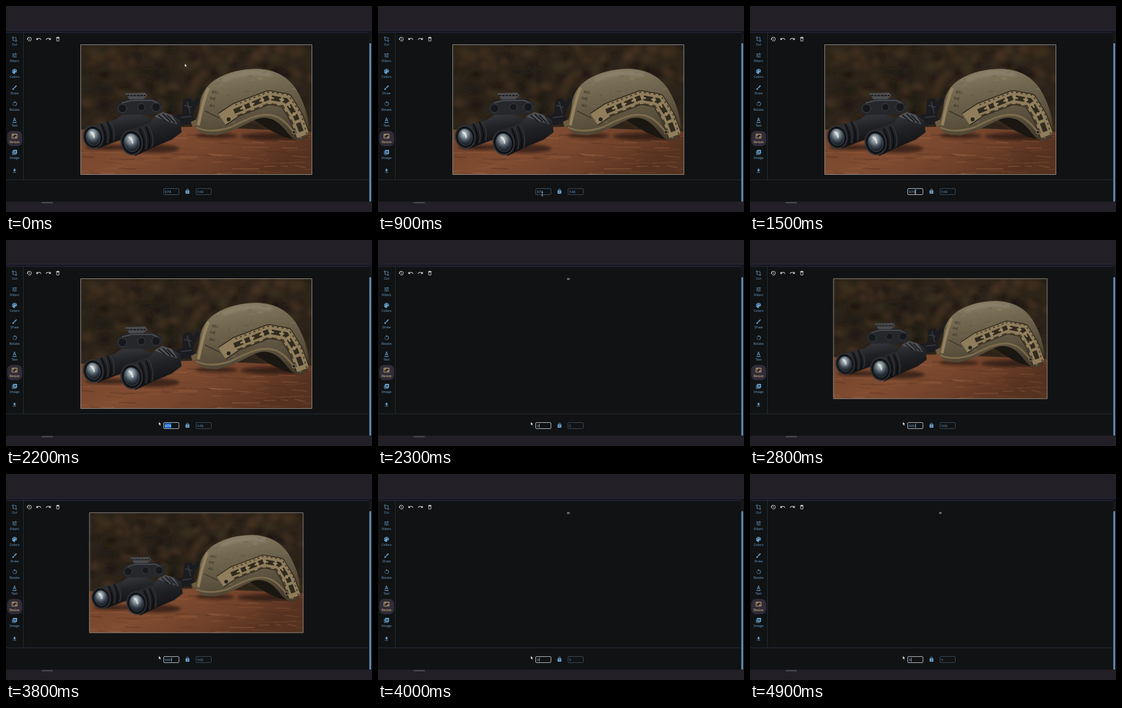
An HTML page that plays this animation: 600 px wide and 338 px high, repeating every 5 s.

```html
<!DOCTYPE html>
<html lang="en">
<head>
<meta charset="utf-8">
<title>Resize panel</title>
<style>
html, body { margin: 0; width: 100%; height: 100%; overflow: hidden; background: #101213; }
svg { display: block; width: 600px; height: 338px; }
text { font-family: "Noto Sans", "Open Sans", sans-serif; }
.label { font-size: 5.4px; text-anchor: middle; }
.num { font-size: 6.1px; }
.ink { font-family: "Liberation Sans", sans-serif; font-size: 6px; font-style: italic; fill: #25221f; }
</style>
</head>
<body>
<svg viewBox="0 0 600 338" xmlns="http://www.w3.org/2000/svg">
  <defs>
    <linearGradient id="wood" x1="0" y1="0" x2="1" y2=".35">
      <stop offset="0" stop-color="#714229"/><stop offset=".4" stop-color="#814d32"/>
      <stop offset=".75" stop-color="#70412a"/><stop offset="1" stop-color="#563220"/>
    </linearGradient>
    <linearGradient id="shell" x1=".3" y1="0" x2=".55" y2="1">
      <stop offset="0" stop-color="#867b64"/><stop offset=".3" stop-color="#72674f"/>
      <stop offset=".7" stop-color="#5a503d"/><stop offset="1" stop-color="#453b2c"/>
    </linearGradient>
    <linearGradient id="tube" x1=".3" y1="0" x2=".55" y2="1">
      <stop offset="0" stop-color="#393b40"/><stop offset=".4" stop-color="#212226"/>
      <stop offset="1" stop-color="#0d0d0f"/>
    </linearGradient>
    <radialGradient id="glass" cx=".5" cy=".3" r=".7">
      <stop offset="0" stop-color="#d6dad8"/><stop offset=".3" stop-color="#87949c"/>
      <stop offset=".65" stop-color="#39434e"/><stop offset="1" stop-color="#111317"/>
    </radialGradient>
    <filter id="soft" x="-10%" y="-10%" width="120%" height="120%"><feGaussianBlur stdDeviation="3.5"/></filter>
    <filter id="blur" x="-20%" y="-50%" width="140%" height="200%"><feGaussianBlur stdDeviation="2.2"/></filter>
    <clipPath id="crop"><rect x="122" y="63" width="380" height="214"/></clipPath>
    <clipPath id="dome"><path id="domeShape" d="M311 198C310 189 316 176 318 160C319 146 328 131 343 121C363 108 389 103 411 103C443 104 463 117 476 137C488 157 496 179 496 203C496 214 490 221 480 221C468 220 462 207 453 198C440 184 424 179 407 187C388 196 371 207 346 212C328 213 313 208 311 198Z"/></clipPath>
  </defs>

  <rect width="600" height="338" fill="#101213"/>
  <rect width="600" height="40" fill="#221f26"/>
  <rect y="39.4" width="600" height="1.1" fill="#2c2c47"/>
  <rect y="40.5" width="600" height="2.5" fill="#19181e"/>
  <rect y="43" width="595" height="1" fill="#23283d"/>
  <rect x="28" y="44" width="1" height="241" fill="#232b38"/>
  <rect y="284.6" width="595" height="1" fill="#272f3d"/>
  <rect x="595" y="44" width="5" height="277" fill="#16171b"/>
  <rect x="595.7" y="61" width="2.8" height="260" rx="1.2" fill="#6596c1"/>
  <rect y="321" width="600" height="17" fill="#221f26"/>
  <rect x="58" y="321.6" width="19" height="2.2" rx="1" fill="#4b4a50"/>
  <rect x="2" y="205" width="24.5" height="25" rx="8" fill="#302c39"/>
  <g id="icons"></g>

  <g id="photo">
    <g clip-path="url(#crop)">
      <rect x="122" y="63" width="380" height="214" fill="#2e241a"/>
      <g id="leaves" filter="url(#soft)"></g>
      <path d="M122 203L310 198L502 206V277H122Z" fill="url(#wood)"/>
      <g id="grain"></g>
      <g fill="#120a07" opacity=".6" filter="url(#blur)">
        <ellipse cx="172" cy="232" rx="42" ry="4"/><ellipse cx="242" cy="234" rx="42" ry="7"/>
        <ellipse cx="345" cy="213" rx="34" ry="4"/><ellipse cx="440" cy="214" rx="55" ry="6"/>
      </g>

      <path d="M407 187C440 172 470 186 486 219C462 222 432 204 407 187Z" fill="#1a1611"/>
      <use href="#domeShape" fill="url(#shell)"/>
      <g clip-path="url(#dome)" fill="none">
        <g id="wear"></g>
        <path d="M355 122C378 110 407 108 436 113" stroke="#a19a86" stroke-width="8" opacity=".35" filter="url(#blur)"/>
        <path d="M311 199C329 207 350 205 368 199C392 188 411 176 434 179C462 184 467 209 484 216" stroke="#7d6c4d" stroke-width="3"/>
        <path d="M315 196C320 175 322 158 332 134" stroke="#94825f" stroke-width="5"/>
        <path d="M326 172L350 184" stroke="#3b3326" stroke-width="1.4"/>
        <g stroke-linejoin="round">
          <path d="M354 186L378 170L431 150L459 155L475 181L487 213" stroke="#2f281d" stroke-width="24"/>
          <path d="M354 186L378 170L431 150L459 155L475 181L487 213" stroke="#8f7d5b" stroke-width="21"/>
          <path d="M374 173L431 150L459 155L475 181L485 208" stroke="#312a1f" stroke-width="8" stroke-dasharray="15 4 9 5"/>
          <path d="M384 169L431 150L459 155L474 180" stroke="#a08c67" stroke-width="2.5" stroke-dasharray="8 9"/>
          <path d="M376 162L431 141L463 146L484 178L493 210" stroke="#3f3527" stroke-width="2" stroke-dasharray="3 5"/>
          <path d="M379 180L431 160L454 164L468 188L477 212" stroke="#41372a" stroke-width="2.4" stroke-dasharray="9 6"/>
        </g>
        <circle cx="365" cy="186" r="4" fill="#282723" stroke="#9b8964"/>
        <circle cx="472" cy="207" r="3" fill="#282723" stroke="#9b8964"/>
      </g>
      <g class="ink" transform="translate(337 143) rotate(4)">
        <text>KILL</text><text x="-3" y="11">THE</text><text x="-2" y="22">ALL</text>
      </g>

      <path d="M274 181L289 177L290 154L302 151L307 158L315 148L318 154L306 178L311 190L300 194L280 197Z" fill="#1b1c20"/>
      <path d="M292 163L304 166M287 183L304 181M297 157L302 176" stroke="#3c3e44" stroke-width="1.6" fill="none"/>
      <path d="M303 190L312 186L314 196L306 199Z" fill="#6e5a3e"/>
      <path d="M181 172L184 160L201 152H240L256 159V172L243 178L192 182Z" fill="#25272b"/>
      <path d="M195 143L228 142L232 147L225 153H202Z" fill="#4b4c4f"/>
      <path d="M198 147H229" stroke="#1b1c1f" stroke-width="2" stroke-dasharray="4 1.500"/>
      <path d="M190 159L206 155H240L250 160" stroke="#53565b" stroke-width="1.5" fill="none"/>
      <g fill="#17181b" stroke="#3d4046" stroke-width="1">
        <circle cx="191" cy="168" r="7"/><circle cx="222" cy="166" r="6"/><circle cx="246" cy="166" r="7"/>
      </g>
      <path d="M136 198L176 188L190 179L221 178L240 186L233 207L184 221L150 234Z" fill="url(#tube)"/>
      <path d="M196 206L235 192L247 178L268 177L285 187L288 207L272 219L246 230L212 246Z" fill="url(#tube)"/>
      <path d="M243 181L257 174L272 179L281 194L266 190Z" fill="#505257"/>
      <path d="M250 179L263 190M257 177L270 190M264 179L277 192" stroke="#17191d" stroke-width="2"/>
      <g id="lenses"></g>
    </g>
    <rect x="122.500" y="63.500" width="379" height="213" fill="none" stroke="#8b8985" vector-effect="non-scaling-stroke"/>
  </g>

  <g fill="none">
    <rect id="box" x="258.5" y="299.5" width="25" height="10" rx="1.5"/>
    <rect x="311.5" y="299.5" width="25" height="10" rx="1.5" stroke="#39485a"/>
  </g>
  <rect id="mark" y="300.7" height="8" fill="#1769d2"/>
  <text id="wide" class="num" x="260.3" y="306.8"></text>
  <text id="high" class="num" x="313.3" y="306.8" fill="#5d86ad"></text>
  <rect id="caret" y="301.3" width=".7" height="6.8" fill="#c8d3df"/>
  <path id="arrow" d="M0 0V5.4L1.3 4.3L2.2 6.2L3.1 5.8L2.2 4L3.8 3.8Z" fill="#fff" stroke="#111" stroke-width=".4"/>
  <path id="beam" d="M-1.2 -3H1.2M0 -3V3M-1.2 3H1.2" fill="none" stroke="#c3c7cc" stroke-width=".8"/>
</svg>
<script>
const $ = id => document.getElementById(id);
const BLUE = '#68a1cf', GOLD = '#e3c17a', WHITE = '#e4e6e8';

const shapes = {
  cut: 'M17 15h2V7c0-1.1-.9-2-2-2H9v2h8v8zM7 17V1H5v4H1v2h4v10c0 1.1.9 2 2 2h10v4h2v-4h4v-2H7z',
  filters: 'M3 17v2h6v-2H3zM3 5v2h10V5H3zm10 16v-2h8v-2h-8v-2h-2v6h2zM7 9v2H3v2h4v2h2V9H7zm14 4v-2H11v2h10zm-6-4h2V7h4V5h-4V3h-2v6z',
  colors: 'M12 2a10 10 0 0 0 0 20c2 0 3-1.5 2-3s0-3 2-3h2c2.5 0 4-2 4-5 0-5-4.5-9-10-9z',
  draw: 'M7 14c-1.7 0-3 1.3-3 3 0 1.3-1.2 2-2 2 1 1.2 2.5 2 4 2 2.2 0 4-1.8 4-4 0-1.7-1.3-3-3-3zm13.7-9.4l-1.3-1.3c-.4-.4-1-.4-1.4 0L9 12.2 11.8 15l8.9-9c.4-.4.4-1 0-1.4z',
  rotate: 'M13 4V1L8.5 5.5 13 10V6a6 6 0 0 1 0 12v2a8 8 0 0 0 0-16zM7 8.5L5.7 7 4 11h2zM6 13H4l1.7 4 1.4-1.5zM7 18.3l4 1.7v-2l-2.5-1z',
  text: 'M4 20h16v3H4zM11 2L5.5 17h2.2l1.1-3h6.300l1.1 3h2.300L13 2h-2zm-1.4 10L12 5.7 14.4 12z',
  resize: 'M19 12h-2v3h-3v2h5v-5zM7 9h3V7H5v5h2V9zm14-6H3c-1.1 0-2 .9-2 2v14c0 1.1.9 2 2 2h18c1.1 0 2-.9 2-2V5c0-1.1-.9-2-2-2zm0 16H3V5h18z',
  image: 'M4 6H2v14c0 1.1.9 2 2 2h14v-2H4V6zm16-4H8c-1.1 0-2 .9-2 2v12c0 1.1.9 2 2 2h12c1.1 0 2-.9 2-2V4c0-1.1-.9-2-2-2zm-1 9h-4v4h-2v-4H9V9h4V5h2v4h4v2z',
  save: 'M19 9h-4V3H9v6H5l7 7 7-7zM5 18v2h14v-2H5z',
  history: 'M13 3a9 9 0 0 0-9 9H1l4 4 4-4H6a7 7 0 1 1 2 5l-1.4 1.4A9 9 0 1 0 13 3zm-1 5v5l4.3 2.5.7-1.2-3.5-2V8z',
  undo: 'M12.5 8c-2.6 0-5 1-6.9 2.6L2 7v9h9l-3.6-3.6a8 8 0 0 1 12.7 3.6l2.4-.8A10.5 10.5 0 0 0 12.5 8z',
  bin: 'M6 19c0 1.1.9 2 2 2h8c1.1 0 2-.9 2-2V7H6v12zM8 9h8v10H8V9zm7.5-5l-1-1h-5l-1 1H5v2h14V4z',
  lock: 'M18 8h-1V6a5 5 0 0 0-10 0v2H6c-1.1 0-2 .9-2 2v10c0 1.1.9 2 2 2h12c1.1 0 2-.9 2-2V10c0-1.1-.9-2-2-2zm-6 9a2 2 0 1 1 0-4 2 2 0 0 1 0 4zm3-9H9V6a3 3 0 0 1 6 0z'
};

function icon(name, x, y, size, color, flip = 1) {
  const k = size / 24;
  return `<path d="${shapes[name]}" fill="${color}" fill-rule="evenodd"
    transform="translate(${x} ${y}) scale(${k * flip} ${k}) translate(-12 -12)"/>`;
}

const tools = ['Cut', 'Filters', 'Colors', 'Draw', 'Rotate', 'Text', 'Resize', 'Image'];
const bar = tools.map((name, i) => {
  const y = 54.3 + i * 26.55, color = name === 'Resize' ? GOLD : BLUE;
  return icon(name.toLowerCase(), 14, y, 10, color) +
    `<text class="label" x="14" y="${y + 11}" fill="${color}">${name}</text>`;
});
const holes = [[11.3, 107.2], [12.8, 105.3], [15.4, 105.3], [16.9, 107.2]]
  .map(([x, y]) => `<circle cx="${x}" cy="${y}" r=".7" fill="#101213"/>`);
$('icons').innerHTML = bar.join('') + holes.join('') +
  icon('save', 14, 270.3, 9, BLUE) + icon('history', 38, 54.3, 9.4, WHITE) +
  icon('undo', 53.7, 54, 9.4, WHITE) + icon('undo', 69.5, 54, 9.4, WHITE, -1) +
  icon('bin', 85, 54.3, 9.4, WHITE) + icon('lock', 297.5, 304, 9.4, BLUE);

let seed = 11;
const rnd = (a, b) => {
  seed = (seed * 16807) % 2147483647;
  return a + (b - a) * seed / 2147483647;
};
const pick = list => list[Math.floor(rnd(0, list.length))];
const many = (n, make) => Array.from({ length: n }, make).join('');

$('leaves').innerHTML = many(230, () =>
  `<ellipse cx="${rnd(118, 506)}" cy="${rnd(60, 200)}" rx="${rnd(4, 13)}" ry="${rnd(3, 9)}"
    fill="${pick(['#1d1812', '#4a3524', '#36301e', '#17130e', '#45301f', '#292419'])}" opacity=".7"/>`);

$('grain').innerHTML = many(130, () => {
  const x = rnd(100, 495), y = rnd(208, 277);
  return `<path d="M${x} ${y}l${rnd(8, 45)} ${rnd(-3, 4)}" stroke="${pick(['#a36b49', '#4c2c1c', '#935a3a', '#5d3624'])}"
    stroke-width="${rnd(.5, 2.2)}" opacity=".4"/>`;
});

$('wear').innerHTML = many(60, () =>
  `<ellipse cx="${rnd(320, 480)}" cy="${rnd(106, 200)}" rx="${rnd(1, 6)}" ry="${rnd(.5, 2.5)}"
    fill="${pick(['#8f856d', '#50483a', '#7d7568'])}" opacity=".28"/>`);

function lens(x, y, r) {
  const ribs = many(6, (_, i) =>
    `<path d="M${x + 3 + i * 5} ${y - r - i * 1.6}q10 ${r} 5 ${2 * r - 4}" fill="none" stroke="${i % 2 ? '#303237' : '#0c0d0f'}" stroke-width="2"/>`);
  return ribs + `<g transform="rotate(-12 ${x} ${y})">
    <ellipse cx="${x}" cy="${y}" rx="${r * .86}" ry="${r}" fill="#111215" stroke="#303338" stroke-width="2"/>
    <ellipse cx="${x}" cy="${y}" rx="${r * .62}" ry="${r * .74}" fill="url(#glass)" stroke="#3c4650"/>
    <path d="M${x - 3} ${y - r * .5}q6 4 4 ${r * .6}" stroke="#f0f1ec" stroke-width="2.4" fill="none" opacity=".75"/></g>`;
}
$('lenses').innerHTML = lens(143, 215, 18.5) + lens(206, 224, 20);

// [time, width typed, height shown]
const typed = [
  [0, '974', '548'], [2300, '9', '5'], [2500, '90', '51'], [2600, '900', '506'],
  [3900, '90', '51'], [4000, '9', '5'], [4100, '', ''], [4900, '8', '5']
];
// [time, x, y] of the pointer
const path = [
  [0, 293, 94.5], [100, 293, 94.5], [600, 271, 300], [900, 269.3, 308.5], [1300, 270, 307],
  [1500, 271, 305], [2000, 250.5, 298.5], [5000, 250.5, 298.5]
];
const FOCUS = 1300, DRAG = 1500, DRAG_END = 1900;
const clamp = v => Math.max(0, Math.min(1, v));

function pointer(t) {
  const i = path.findIndex((p, n) => n && t <= p[0]);
  const [t0, x0, y0] = path[i - 1], [t1, x1, y1] = path[i];
  const u = (t - t0) / (t1 - t0), e = u * u * (3 - 2 * u);
  return [x0 + (x1 - x0) * e, y0 + (y1 - y0) * e];
}

const set = (id, attrs) => {
  for (const key in attrs) $(id).setAttribute(key, attrs[key]);
};

function draw(t) {
  const [start, w, h] = typed.filter(s => s[0] <= t).pop();
  const focused = t >= FOCUS;
  $('wide').textContent = w;
  $('high').textContent = h;
  set('photo', {
    transform: `translate(312 63) scale(${w / 974 || 1}) translate(-312 -63)`,
    visibility: w ? 'visible' : 'hidden'
  });

  const picked = t < 2300 ? clamp((t - DRAG) / (DRAG_END - DRAG)) * 10.6 : 0;
  set('mark', { x: 270.8 - picked, width: picked });
  set('wide', { fill: picked > 5 ? '#ffffff' : BLUE });
  set('box', { stroke: focused ? '#b0b7bf' : '#3c526a' });

  const since = t - Math.max(start, FOCUS);
  const blink = focused && !picked && since % 1000 < 500;
  set('caret', { x: 260.5 + w.length * 3.5, visibility: blink ? 'visible' : 'hidden' });

  const [x, y] = pointer(t);
  const inside = x > 257 && x < 284 && y > 298;
  set('arrow', { transform: `translate(${x} ${y})`, visibility: inside ? 'hidden' : 'visible' });
  set('beam', { transform: `translate(${x} ${y})`, visibility: inside ? 'visible' : 'hidden' });
}

const LOOP = 5000, STEP = 100, begin = performance.now();
let last = -1;
function tick() {
  const t = Math.floor(((performance.now() - begin) % LOOP) / STEP) * STEP;
  if (t !== last) draw(last = t);
  requestAnimationFrame(tick);
}
tick();
</script>
</body>
</html>
```
